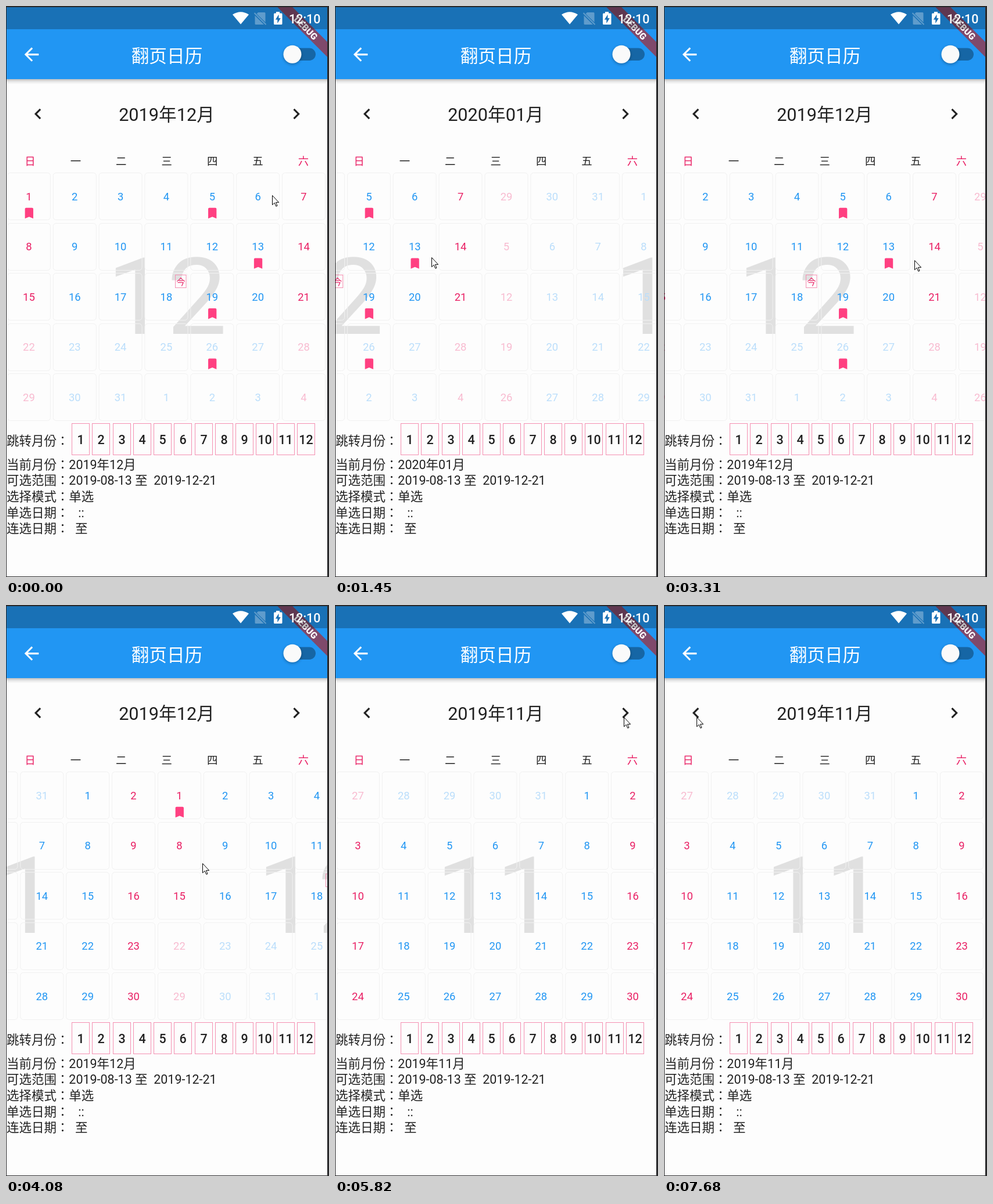
An HTML page for the animation above (8 s loop, 556 by 984 pixels).

```html
<!DOCTYPE html>
<html>
<head>
<meta charset="utf-8">
<title>翻页日历</title>
<style>
  html, body { margin: 0; width: 100%; height: 100%; overflow: hidden; background: #2a2a2c; }
  svg { display: block; }
  text { font-family: Roboto, "Noto Sans CJK JP", "Noto Sans CJK SC", sans-serif; white-space: pre; }
  .mid { text-anchor: middle; }
  .ink { fill: #212121; }
  .day { font-size: 18.4px; text-anchor: middle; }
  .info { font-size: 21.47px; }
  .cell { fill: none; stroke: #f1f1f1; }
  .pink { fill: none; stroke: #f48fb1; }
</style>
</head>
<body>
<svg id="stage" width="556" height="984" viewBox="0 0 556 984">
  <defs>
    <clipPath id="screen"><rect x="1" y="2" width="552" height="981"/></clipPath>
    <filter id="soft" x="-50%" y="-50%" width="200%" height="200%"><feGaussianBlur stdDeviation="2.5"/></filter>
    <linearGradient id="shade" x2="0" y2="1">
      <stop offset="0" stop-opacity=".24"/>
      <stop offset=".5" stop-opacity=".08"/>
      <stop offset="1" stop-opacity="0"/>
    </linearGradient>
    <path id="mark" transform="translate(-12.27 -12.27) scale(1.022)" fill="#ff4081"
      d="M17 3H7c-1.1 0-2 .9-2 2V21l7-3 7 3V5c0-1.1-.9-2-2-2z"/>
  </defs>
  <g clip-path="url(#screen)">
    <rect width="556" height="984" fill="#fdfdfd"/>
    <g id="pages"></g>
    <g id="static"></g>

    <!-- app bar -->
    <rect y="126" width="556" height="9" fill="url(#shade)"/>
    <rect width="556" height="126" fill="#2196f3"/>
    <path fill="#fff" transform="translate(25.6 65.2) scale(1.533)"
      d="M20 11H7.83l5.59-5.59L12 4l-8 8 8 8 1.41-1.41L7.83 13H20z"/>
    <text class="mid" x="277" y="97" font-size="30.67" fill="#fff">翻页日历</text>
    <rect x="482" y="72.5" width="51" height="21.5" rx="10.75" fill="#1666a5"/>
    <circle cx="493" cy="85" r="15.5" opacity=".3" filter="url(#soft)"/>
    <circle cx="493" cy="83.3" r="15.5" fill="#fafafa"/>

    <!-- corner banner -->
    <g transform="translate(553 1) rotate(45)">
      <rect x="-61.3" y="42.9" width="122.6" height="18.4" fill="#b71c1c" fill-opacity=".627"/>
      <text class="mid" y="57.7" font-size="15.6" font-weight="900" fill="#fff">DEBUG</text>
    </g>

    <!-- status bar -->
    <rect width="556" height="40" opacity=".25"/>
    <g fill="#fff">
      <path d="M404 31.5L390 14.8Q404 5.6 418 14.8Z"/>
      <g opacity=".3">
        <path d="M434 11H445Q446.5 11 446.5 12.5V28L431.5 13.5ZM428.5 16.5L444 32H430Q428.5 32 428.5 30.5Z"/>
        <path d="M427.5 12L447.5 32" stroke="#fff" stroke-width="2"/>
      </g>
      <path d="M465 10H471V12.5H474Q475.5 12.5 475.5 14V30.5Q475.5 32 474 32H462.5Q461 32 461 30.5V14Q461 12.5 462.5 12.5H465Z"/>
      <path d="M469.5 14.5L463.8 23.5H467.3V30L472.8 21H469.5Z" fill="#1970b6"/>
      <text x="487" y="30" font-size="21.47" font-weight="500">12:10</text>
    </g>
  </g>
  <path id="cursor" fill="#fff" stroke="#000" d="M.5.5V16.7L4.2 13.2L6.8 19.2L9 18.3L6.5 12.4H11.6Z"/>
</svg>
<script>
const LOOP = 8000, TICK = 130, PAGE = 552;
const $ = id => document.getElementById(id);
const text = (x, y, str, attrs = '') => `<text x="${x}" y="${Math.round(y)}" ${attrs}>${str}</text>`;
const rect = (x, y, w, h, attrs) => `<rect x="${x}" y="${y}" width="${w}" height="${h}" ${attrs}/>`;
const range = (n, fn) => Array.from({ length: n }, (_, i) => fn(i)).join('');

// Calendar pages; page 0 is December 2019
const LAST = Date.UTC(2019, 11, 21);
const MARKED = [1, 5, 13, 19, 26];

function cell(month, i) {
  const first = new Date(Date.UTC(2019, month, 1));
  const date = new Date(Date.UTC(2019, month, 1 - first.getUTCDay() + i));
  const d = date.getUTCDate(), col = i % 7, row = Math.floor(i / 7);
  const x = 39.4 + 78.85 * col, y = 86.6 * row, top = Math.round(y) + 287.5;
  const inMonth = date.getUTCMonth() === first.getUTCMonth();
  const faded = !inMonth || date > LAST;
  const weekend = col % 6 === 0;
  const color = weekend ? (faded ? '#f8bbd0' : '#e91e63') : (faded ? '#bbdefb' : '#2196f3');
  let out = rect(x - 37, top, 74, 81, 'class="cell" rx="5"')
    + text(x, y + 334.6, d, `class="day" fill="${color}"`);
  if (month === 11 && inMonth) {
    if (MARKED.includes(d)) out += `<use href="#mark" x="${x + .4}" y="${y + 357}"/>`;
    if (d === 18) {
      out += rect(x + 15.6, top + 3, 18.5, 22, 'class="pink"')
        + text(x + 24.9, top + 20, '今', 'class="mid" font-size="15.3" fill="#e91e63"');
    }
  }
  return out;
}

function page(index) {
  const month = 11 + index;
  return `<g transform="translate(${index * PAGE} 0)">`
    + text(277, 565, month % 12 + 1, 'class="mid" font-size="184" fill="#e0e0e0"')
    + range(35, i => cell(month, i)) + '</g>';
}
$('pages').innerHTML = [-1, 0, 1].map(page).join('');

// Header, weekday names and information lines
const icon = (x, d) => `<path class="ink" transform="translate(${x} 167.6) scale(1.533)" d="${d}"/>`;
const info = (line, str, attrs = '') => text(1, 797.7 + 27.6 * line, str, 'class="info ink" ' + attrs);
const jump = i => {
  const x = Math.round(113 + 35.25 * i) + .5;
  return rect(x, 719.5, 30, 54, 'class="pink"')
    + text(x + 15, 755, i + 1, 'class="info mid ink" font-weight="500"');
};
$('static').innerHTML =
  icon(36.6, 'M15.41 7.41L14 6l-6 6 6 6 1.41-1.41L10.83 12z')
  + icon(481.3, 'M10 6L8.59 7.41 13.17 12l-4.58 4.59L10 18l6-6z')
  + text(276.5, 198, '', 'id="title" class="mid ink" font-size="30.67"')
  + [...'日一二三四五六'].map((c, i) =>
      text(41.5 + 78.4 * i, 273.6, c, `class="day" fill="${i % 6 ? '#212121' : '#e91e63'}"`)).join('')
  + text(1, 757, '跳转月份：', 'class="info ink"')
  + range(12, jump)
  + info(0, '', 'id="current"')
  + info(1, '可选范围：2019-08-13 至  2019-12-21')
  + info(2, '选择模式：单选')
  + info(3, '单选日期：   ::')
  + info(4, '连选日期：  至');

// Moves: start, end, then where it arrives
const swipes = [
  [520, 1020, 274], [1375, 1675, PAGE],
  [2030, 2730, 276], [2900, 3380, 0],
  [3690, 4030, -259], [4250, 4850, -PAGE],
  [6200, 6680, 0], [7340, 7640, -PAGE]
];
const pointer = [
  [0, 520, 438, 455], [520, 1020, 166, 433], [2030, 2730, 431, 438], [3400, 3690, 79, 440],
  [3690, 4030, 338, 445], [4850, 5300, 497, 193], [6560, 6890, 56, 193]
];

function follow(from, moves, t) {
  return moves.reduce((pos, [start, end, ...to]) => {
    const p = Math.min(Math.max((t - start) / (end - start), 0), 1);
    const eased = (1 - Math.cos(Math.PI * p)) / 2;
    return pos.map((v, i) => v + (to[i] - v) * eased);
  }, from);
}

function draw() {
  const now = performance.now() % LOOP;
  const t = now - now % TICK;
  const [shift] = follow([0], swipes, t);
  const [x, y] = follow([458, 326], pointer, t).map(Math.round);
  const month = new Date(Date.UTC(2019, 11 + Math.round(shift / PAGE), 1));
  const label = `${month.getUTCFullYear()}年${String(month.getUTCMonth() + 1).padStart(2, '0')}月`;
  $('pages').setAttribute('transform', `translate(${-shift} 0)`);
  $('cursor').setAttribute('transform', `translate(${x} ${y})`);
  $('title').textContent = label;
  $('current').textContent = '当前月份：' + label;
  requestAnimationFrame(draw);
}
draw();
</script>
</body>
</html>
```
